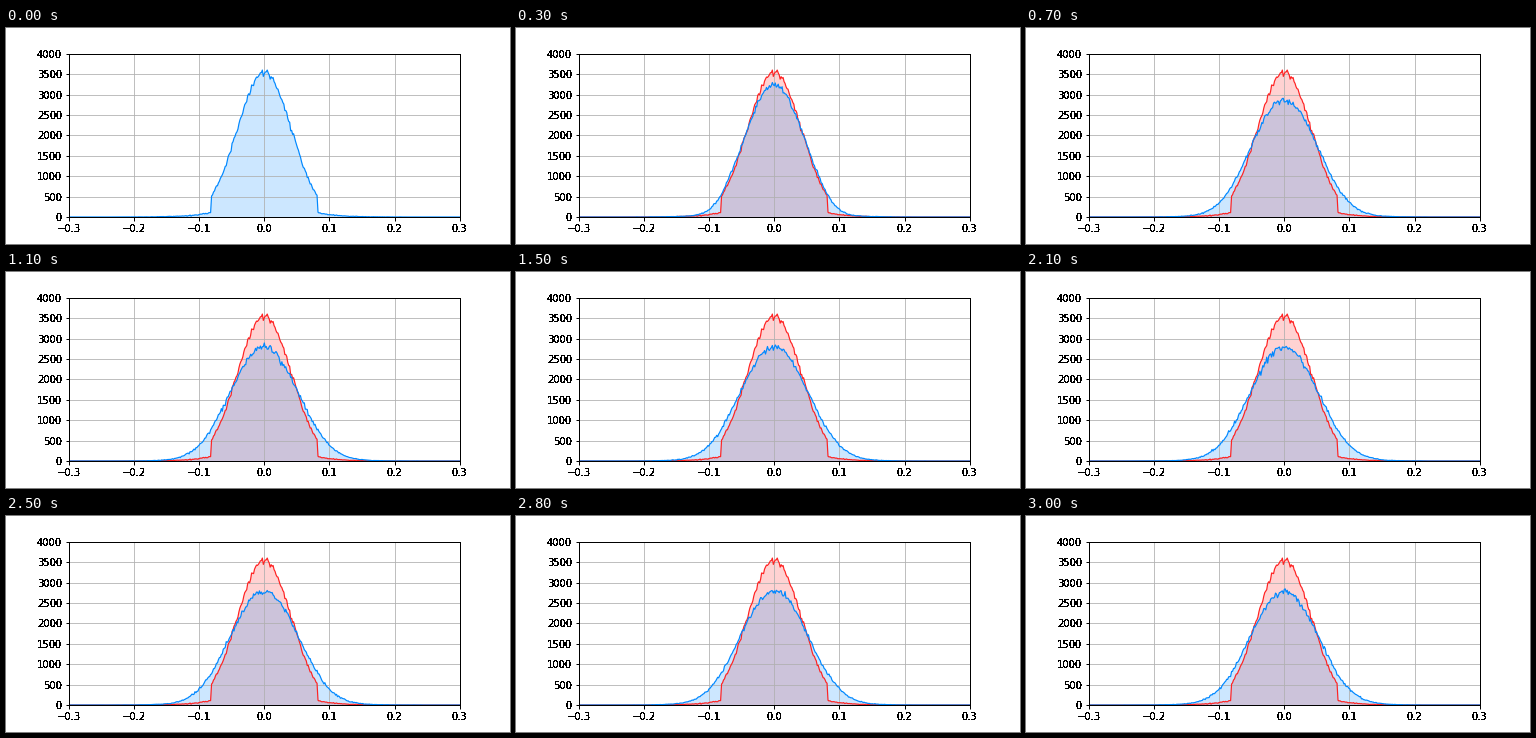
A matplotlib script that plays this animation: 504x216 px, repeating every 3600 ms.

```python
import numpy as np
import matplotlib.pyplot as plt
from matplotlib.animation import FuncAnimation

FRAMES, INTERVAL = 36, 100
LAST_STEP = 30          # the picture rests after this step
BIN = 0.0015
BLUE, RED = "#0088ff", "#ff2222"

x = np.arange(-300, 301) * BIN


def start_shape():
    """Bell with a sudden drop at the cut and a short exponential tail."""
    cut = 0.082
    bell = 3560 * np.exp(-0.5 * (x / 0.0415) ** 2)
    tail = 110 * np.exp(-(np.abs(x) - cut) / 0.028)
    return np.where(np.abs(x) < cut, bell, tail)


def spread(step):
    """Width of the blur, growing quickly and then settling."""
    return 0.0326 * np.sqrt(1 - np.exp(-(step / 4.88) ** 1.84))


def counts(step):
    y = start_shape()
    if step:
        kernel = np.exp(-0.5 * (x / spread(step)) ** 2)
        y = np.convolve(y, kernel / kernel.sum(), mode="same")
    rng = np.random.default_rng(40 + step)
    return np.maximum(y + 0.75 * np.sqrt(y) * rng.standard_normal(x.size), 0)


def outline(y):
    return np.column_stack([np.r_[x[0], x, x[-1]], np.r_[0, y, 0]])


def harden(img, dpi):
    """Turn soft glyph edges into solid black pixels."""
    out = np.zeros_like(img)
    out[..., 3] = img[..., 3] > 0.2
    return out, 0, 0


plt.rcParams.update({"font.family": "DejaVu Sans", "font.size": 10,
                     "axes.linewidth": 1})
fig, ax = plt.subplots(figsize=(7, 3), dpi=72)
fig.subplots_adjust(left=0.125, right=0.9, bottom=0.125, top=0.88)
ax.set(xlim=(-0.3, 0.3), ylim=(0, 4000))
ax.set_xticks(np.arange(-3, 4) / 10,
              [f"{v / 10:.1f}".replace("-", "\u2212") for v in range(-3, 4)])
ax.set_yticks(range(0, 4001, 500), [str(v) for v in range(0, 4001, 500)])
ax.tick_params(width=1)
ax.grid(color="#b0b0b0", linewidth=0.8)
for label in ax.get_xticklabels() + ax.get_yticklabels():
    label.set_agg_filter(harden)


def add_curve(color):
    y = counts(0)
    area, = ax.fill(*outline(y).T, color=color, alpha=0.2, linewidth=0)
    line, = ax.plot(x, y, color=color, linewidth=1.2)
    return area, line


before = add_curve(RED)
area, line = add_curve(BLUE)


def draw(frame):
    step = min(frame, LAST_STEP)
    y = counts(step)
    area.set_xy(outline(y))
    line.set_ydata(y)
    for artist in before:
        artist.set_visible(step > 0)
    return area, line, *before


anim = FuncAnimation(fig, draw, frames=FRAMES, interval=INTERVAL,
                     init_func=lambda: draw(0), repeat=True, blit=False)
plt.show()
```
